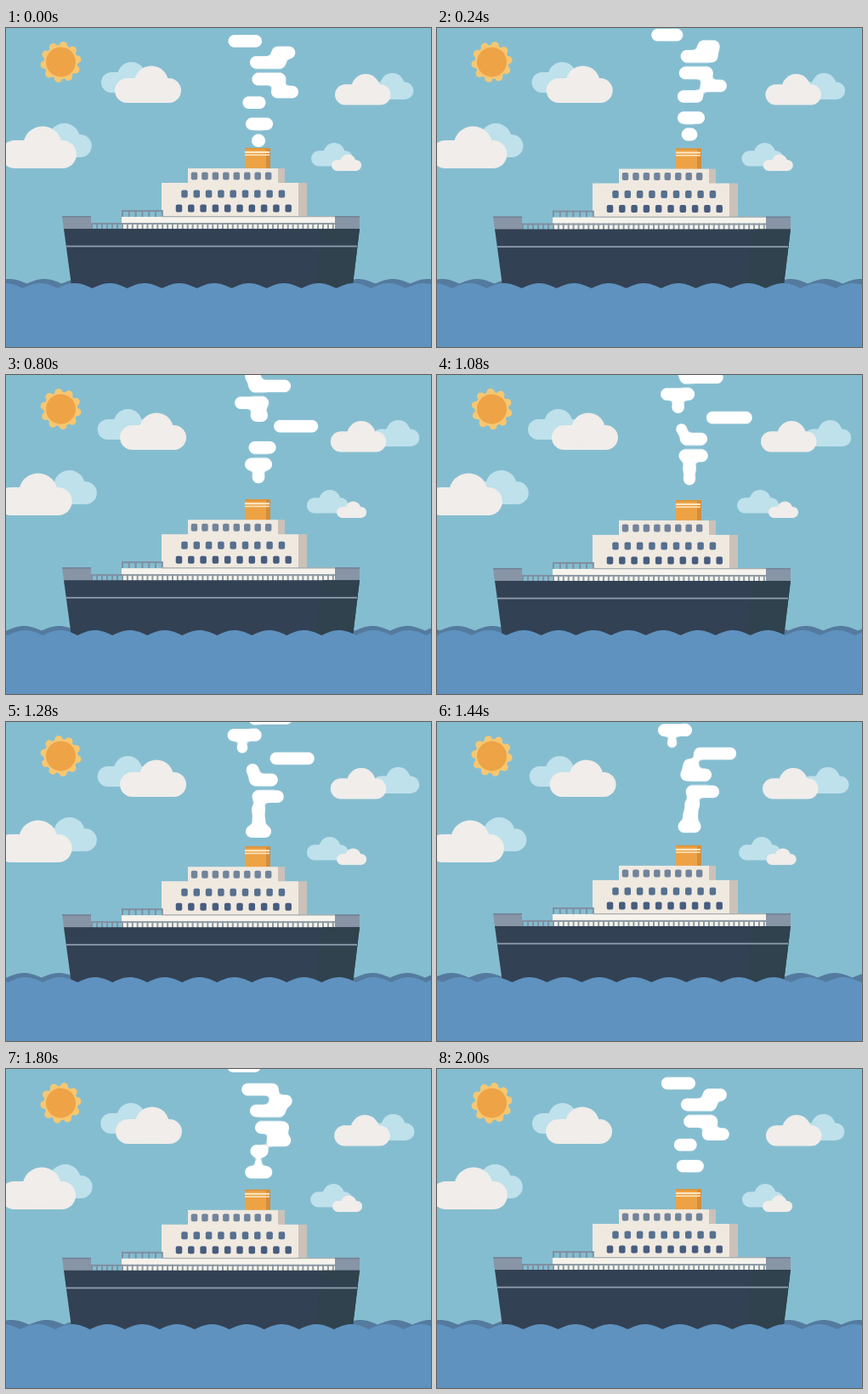
These frames come from a looping animation (500 px wide and 375 px high, 2040 ms). An HTML page with a canvas:

```html
<!DOCTYPE html>
<html lang="en">
<head>
<meta charset="utf-8">
<title>Steamship</title>
<style>
html, body { margin: 0; width: 100%; height: 100%; overflow: hidden; background: #85bdd0; }
canvas { display: block; width: 500px; height: 375px; }
</style>
</head>
<body>
<canvas id="stage" width="500" height="375"></canvas>
<script>
const ctx = document.getElementById('stage').getContext('2d');
const LOOP = 2040, STEP = 40, STEPS = 50;
const TAU = Math.PI * 2;

const ease = k => (1 - Math.cos(k * Math.PI)) / 2;
const mix = (a, b, k) => a + (b - a) * k;

function rect(color, x, y, w, h) {
  ctx.fillStyle = color;
  ctx.fillRect(x, y, w, h);
}

function round(color, x, y, w, h, r) {
  ctx.fillStyle = color;
  ctx.beginPath();
  ctx.roundRect(x, y, w, h, r);
  ctx.fill();
}

function disc(color, x, y, r) {
  ctx.fillStyle = color;
  ctx.beginPath();
  ctx.arc(x, y, r, 0, TAU);
  ctx.fill();
}

function poly(color, points) {
  ctx.fillStyle = color;
  ctx.beginPath();
  points.forEach(p => ctx.lineTo(p[0], p[1]));
  ctx.fill();
}

// ---- sky ----

function drawSun(sway) {
  const petals = 10;
  ctx.save();
  ctx.translate(64.5, 40);
  ctx.rotate((sway - 0.4) * 0.4);
  for (let i = 0; i < petals; i++) {
    const a = i * TAU / petals;
    disc('#f6c771', Math.cos(a) * 19.5, Math.sin(a) * 19.5, 4.7);
  }
  disc('#f6c771', 0, 0, 20);
  disc('#eea347', 0, 0, 17.5);
  ctx.restore();
}

// Every cloud is the same pill with one hump, scaled
function cloud(color, left, bottom, scale) {
  ctx.save();
  ctx.translate(left, bottom);
  ctx.scale(scale, scale);
  round(color, 0, -29, 78, 29, 14.5);
  disc(color, 43, -23.5, 20);
  ctx.restore();
}

function cloudPair(back, front, sway) {
  cloud('#bee1eb', back.x + back.drift * sway, back.y, back.size);
  cloud('#f0edea', front.x + front.drift * sway, front.y, front.size);
}

function drawClouds(sway) {
  cloudPair({ x: 112, y: 76, size: 0.83, drift: -5 }, { x: 128, y: 88, size: 1, drift: 7 }, sway);
  cloudPair({ x: 29, y: 152, size: 0.92, drift: 7 }, { x: -6, y: 165, size: 1.14, drift: -6 }, sway);
  cloudPair({ x: 424, y: 84, size: 0.71, drift: 8 }, { x: 387, y: 90.5, size: 0.84, drift: -6 }, sway);
  cloudPair({ x: 359, y: 162.5, size: 0.63, drift: -6 }, { x: 383, y: 168, size: 0.45, drift: 7 }, sway);
}

// ---- smoke: puffs rise steadily, sway sideways and melt together ----

const RISE = 1.446;
// path: a few turning points [step, x, half width], eased between
const puffs = [
  { y: 185, path: [[39, 297, 16], [76, 302, 16], [95, 308, 21], [131, 311, 26]] },
  { y: 132.5, path: [[0, 297, 8], [19, 297, 16], [39, 314, 20], [85, 280, 20]] },
  { y: 147.5, path: [[11, 297, 7], [31, 297, 8], [50, 328, 16], [84, 277, 6], [90, 270, 0]] },
  { y: 160, path: [[26, 297, 7], [42, 299, 10], [50, 292, 13.5], [73, 345, 27], [111, 266, 18]] },
  { y: 173.5, path: [[31, 297, 15], [50, 297, 0], [68, 284, 0], [78, 288, 7], [98, 327, 14], [122, 289, 9]] }
];

function puffAt({ y, path }, n) {
  if (n < path[0][0]) return null;
  const next = path.findIndex(p => p[0] > n);
  const b = next < 0 ? path[path.length - 1] : path[next];
  const a = next < 0 ? b : path[next - 1];
  const k = a === b ? 0 : ease((n - a[0]) / (b[0] - a[0]));
  const w = mix(a[2], b[2], k);
  if (w < 0.5) return null;
  const r = Math.min(7.3, w);
  return { x: mix(a[1], b[1], k), y: y - RISE * n, r, half: w - r };
}

const SX = 240, SW = 140, SH = 152, BLEND = 8;
const layer = document.createElement('canvas');
layer.width = SW;
layer.height = SH;
const layerCtx = layer.getContext('2d');
const pixels = layerCtx.createImageData(SW, SH);
pixels.data.fill(255);

function drawSmoke(n) {
  const live = [0, 1, 2]
    .flatMap(cycle => puffs.map(p => puffAt(p, n + cycle * STEPS)))
    .filter(s => s && s.y > -14)
    .sort((a, b) => a.y - b.y);
  for (let j = 0; j < SH; j++) {
    for (let i = 0; i < SW; i++) {
      let d = 99;
      for (const s of live) {
        const dy = j + 0.5 - s.y;
        if (Math.abs(dy) > 20) continue;
        const dx = Math.max(0, Math.abs(i + 0.5 + SX - s.x) - s.half);
        const e = Math.hypot(dx, dy) - s.r;
        const h = Math.max(0, BLEND - Math.abs(d - e));
        d = Math.min(d, e) - h * h / (4 * BLEND);
      }
      pixels.data[(j * SW + i) * 4 + 3] = 255 * Math.max(0, Math.min(1, 0.5 - d));
    }
  }
  layerCtx.putImageData(pixels, 0, 0);
  ctx.drawImage(layer, SX, 0);
}

// ---- ship ----

function windows(color, count, x, y) {
  for (let i = 0; i < count; i++) round(color, x + i * (count < 9 ? 12.45 : 14.3) - 3.75, y, 7.5, 9, 2);
}

function railing(x0, x1, y, h, gap, color) {
  rect(color, x0, y, x1 - x0, 2);
  for (let x = x0; x < x1; x += gap) rect(color, x, y, 2, h);
}

function drawShip(bob) {
  const wall = '#efe9e0', shade = '#cbc1b9', steel = '#8795a6', rail = '#7f90a2';
  ctx.save();
  ctx.translate(0, bob);

  rect('#eda244', 281, 141, 25, 25);
  rect('#d28d3c', 306, 141, 5, 25);
  rect('#d9933b', 281, 141, 30, 1.5);
  rect('#fbe9c8', 281, 145, 29, 2);
  rect('#fbe9c8', 281, 148.5, 29, 1.5);

  rect(wall, 214, 165, 106, 18);
  rect(shade, 320, 165, 8, 18);
  rect(wall, 183, 182, 161, 41);
  rect(shade, 344, 182, 10, 41);
  windows('#72849b', 8, 221.5, 169.5);
  windows('#56708f', 9, 210, 190.5);
  windows('#475d7f', 10, 203.5, 207.5);

  railing(136, 183, 214, 8, 7.8, rail);
  rect('#f5f3ec', 136, 222, 251, 15);
  rect('#a9aeb0', 183, 221, 204, 1.3);
  railing(100, 136, 229, 8, 6, rail);
  railing(136, 387, 229, 8, 5.9, '#8d99a3');

  poly(steel, [[66, 221], [100, 221], [100, 237], [68, 237]]);
  poly(steel, [[387, 221], [416, 221], [416, 237], [387, 237]]);
  rect('#718297', 66, 221, 34, 1.5);
  rect('#718297', 387, 221, 29, 1.5);

  poly('#324153', [[68, 236], [416, 236], [407, 310], [78, 310]]);
  poly('#2f424d', [[373, 236], [416, 236], [407, 310], [362, 310]]);
  rect('#8e9cae', 71, 255.7, 342, 1.8);
  ctx.restore();
}

// ---- sea: round crests, sharp troughs ----

function wave(color, trough, height, shift) {
  const period = 41;
  ctx.fillStyle = color;
  ctx.beginPath();
  ctx.moveTo(0, 375);
  for (let x = 0; x <= 500; x++) {
    ctx.lineTo(x, trough - height * Math.abs(Math.cos((x - shift) / period * Math.PI)));
  }
  ctx.lineTo(500, 375);
  ctx.fill();
}

function draw(n) {
  const sway = ease(2 * n / STEPS);
  rect('#85bdd0', 0, 0, 500, 375);
  drawSun(sway);
  drawClouds(sway);
  drawSmoke(n);
  wave('#547b9f', 300.5, 5.5, 45 + 20 * sway);
  drawShip(6 * sway);
  wave('#5f92bf', 306, 6, 122 - 20 * sway);
}

let start = null, last = -1;
function tick(now) {
  if (start === null) start = now;
  const t = (now - start) % LOOP;
  const n = Math.max(0, Math.floor(t / STEP) - 1);
  if (n !== last) draw(last = n);
  requestAnimationFrame(tick);
}
draw(0);
requestAnimationFrame(tick);
</script>
</body>
</html>
```
